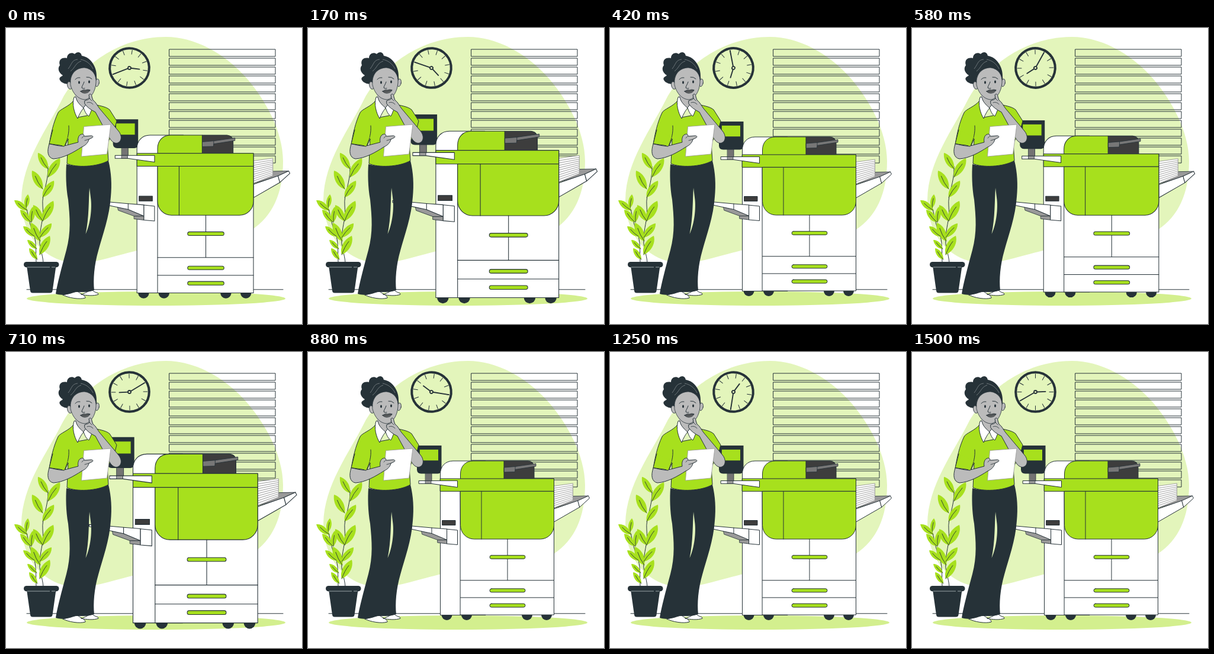
Animation of 500x500 px, one loop 1.54 s. Source, as an HTML page:

```html
<!DOCTYPE html>
<html lang="en">
<head>
<meta charset="utf-8">
<title>Waiting at the copier</title>
<style>
  html, body { margin: 0; width: 100%; height: 100%; overflow: hidden; background: #fff; }
  svg { display: block; width: 100vw; height: 100vh; }
  .g { fill: #a7e01d; }
  .d { fill: #263238; }
  .w { fill: #fff; }
  .s { fill: #bbb; }
  .m { fill: #999; }
  .n { fill: none; }
  .o { stroke: #263238; stroke-width: 1; stroke-linejoin: round; stroke-linecap: round; }
  .thin { stroke-width: .8; }
  .hand { stroke-width: 1.9; }
  .sheet { stroke: #8c8c8c; stroke-width: .8; }
</style>
</head>
<body>
<svg viewBox="0 0 500 500">
  <path fill="#e3f5bb" d="M270 15C318 15 368 42 404 82C438 120 468 175 468 225C468 280 450 318 415 341C370 372 280 360 221 376C180 386 150 397 122 397C60 396 26 345 26 290C27 225 70 170 95 120C125 65 190 15 270 15Z"/>
  <ellipse fill="#d3ef8e" cx="253.5" cy="457" rx="218.5" ry="12"/>
  <path class="n o" d="M35 441.8H468"/>
  <g id="blinds" class="n o"></g>

  <g id="clock">
    <circle class="n" r="33.3" stroke="#263238" stroke-width="4"/>
    <g id="ticks" class="n o"></g>
    <path class="n o hand" transform="rotate(240)" d="M0-2V-29.5"/>
    <path class="n o hand" transform="rotate(88)" d="M0-2V-17"/>
    <circle r="2.5" fill="#e3f5bb" stroke="#263238" stroke-width="1.8"/>
  </g>

  <g id="plant">
    <path class="n o" d="M63 397C62 380 55 370 57 352C59 330 64 322 62 300C60 280 72 262 71 234"/>
    <path class="n o" d="M51 397C50 375 52 362 46 345C38 328 40 322 33 300"/>
    <g id="leaves"></g>
    <path class="d" d="M35 402H84.500L78.500 444Q78 447.500 74 447.500H45Q41.500 447.500 41 444Z"/>
    <rect class="d" x="30" y="395" width="59.5" height="9.3" rx="4.6"/>
    <path class="n" stroke="#b9c4c4" stroke-width=".8" d="M36 404H74M77 404H83"/>
  </g>

  <g id="printer">
    <!-- output tray and paper stack -->
    <path class="m o thin" d="M415 263.5L448 243.500L474 243L457 252Z"/>
    <path class="w sheet" d="M415 226.5L447.500 222V250.500L415 263.500Z"/>
    <path id="sheets" class="n sheet"/>
    <path class="w o" d="M415.5 265L456 251L459 262L415.500 287Z"/>
    <path class="w o" d="M456 251L473.500 243L475.500 247L459 262Z"/>

    <!-- control screen -->
    <rect class="o thin" fill="#737373" x="198.5" y="203" width="10.5" height="16"/>
    <path class="d" d="M184 158H225.500V199.500A6 6 0 0 1 219.500 205.500H191Q184.500 205.500 184 199Z"/>
    <rect class="g o" x="188.5" y="164.3" width="32" height="19.5"/>

    <!-- wheels -->
    <g class="d">
      <circle cx="234.5" cy="444" r="9"/><circle cx="268" cy="444" r="9"/>
      <circle cx="370" cy="444" r="9"/><circle cx="403" cy="444" r="9"/>
    </g>

    <!-- body -->
    <path class="w o" d="M223.5 444V206C223.500 193 232 184 245 184H300V444Z"/>
    <path class="w o" d="M257.5 214H415.500V444H257.500Z"/>
    <path fill="#3d3d3d" class="o" d="M331 184H372Q382 185 382 195V214H331Z"/>
    <path class="g o" d="M257.5 214V206C257.500 193 266 184 279 184H331V214Z"/>
    <path class="g o" d="M223.5 214H415.500V235.300H223.500Z"/>
    <path class="g o" d="M257.5 235.300H415.500V293A23 23 0 0 1 392.500 316H280.500A23 23 0 0 1 257.500 293Z"/>
    <path class="n o" d="M293 235.300V316M337 316V385.700M257.500 385.700H415.500M257.500 414.900H415.500"/>
    <g class="g o">
      <rect x="307" y="343.4" width="60" height="6" rx="3"/>
      <rect x="307" y="399.8" width="60" height="6" rx="3"/>
      <rect x="307" y="425.1" width="60" height="6" rx="3"/>
    </g>
    <path fill="#777" class="o thin" d="M331.5 195L350 193.500L385 188.500V193L350 198.500L349.500 202.500L331.500 203Z"/>
    <path class="n o thin" d="M350 193.500V199"/>
    <rect class="o" fill="#3d3d3d" x="227" y="284.5" width="22" height="8"/>

    <!-- side shelves -->
    <path class="w o" d="M187.500 217.500H252.500V228.500L208 222.300H187.500Z"/>
    <path class="m o thin" d="M198.500 217.500H208V222.300H198.500Z"/>
    <path class="m o thin" d="M192 303L209 305L235 317.500H219L193 308Z"/>
    <path class="m o thin" d="M219 317.500H235V324L219 322Z"/>
    <path class="w o" d="M156 292.500L176 294L209 297L235 299V317.500L209 306.500L176 299.500L156 295.500Z"/>
    <path class="n o" d="M209 306.500V297"/>
    <path class="w o" d="M235 299.200L252.500 301V325.500L235 324Z"/>
  </g>

  <g id="woman">
    <!-- shoes and trousers -->
    <path class="w o" d="M96 451C108 449 116 444 121 445C127 450 134 451 134 456C124 459 106 456 96 451Z"/>
    <path class="w o" d="M127 450C135 448 140 443 146 443C149 447 157 447 156 450C149 453 135 452 127 450Z"/>
    <path class="d" fill-rule="evenodd" d="M102 230C117 235 154 235 173 224C178 244 179 265 177 285C175 318 163 350 156 376C149 400 147 425 149 443C141 446 133 446 125 446L118 446C108 449 95 453 84 449C87 430 94 405 102 375C110 345 108 320 105 290C101 268 101 245 102 230ZM141 270C139.500 290 140.500 320 134.500 348C141 335 145.500 310 143.500 290Z"/>

    <!-- neck and shirt -->
    <path class="g o" d="M114 123C106 133 91 137 88 143C80 160 76 178 73 197L99 201L105 187L103 229C118 236 154 235 173 224L171 195L183 172L187 157L175 138C168 132 155 131 145 128L137 148L121 151Z"/>
    <path class="s" d="M116 112L118 122L131 137L143 128V112Z"/>
    <path class="n o" d="M106 165C107 177 104 188 98 201"/>
    <path class="w o" d="M115 117C111 128 115 143 121 153C124 145 128 139 131 135C125 130 119 124 118 117Z"/>
    <path class="w o" d="M131 135C133 141 136 147 140 149C143 143 146 136 146 129L141 122Z"/>

    <!-- head -->
    <path class="d" d="M108 95C104 95 93 94 90.500 87C89.500 83 94 82 96 80C88 75 87 67 91 63C88 54 94 49 103 51C103 43 111 40 116 44C120 39 127 40 128 47C143 49 154 66 153 83C154 88 152 94 149 97L112 88Z"/>
    <path class="n" stroke="#8b9396" stroke-width=".7" d="M105 69C112 60 111 54 121 53M109 73C117 67 117 59 127 56M126 53C136 55 143 61 147 69"/>
    <ellipse class="s o thin" cx="107.5" cy="97" rx="3.8" ry="6.5" transform="rotate(-15 107.5 97)"/>
    <ellipse class="s o thin" cx="154" cy="92.5" rx="3.3" ry="6.5" transform="rotate(10 154 92.5)"/>
    <path class="s o thin" d="M109 88C111 73 122 67 133 67C146 69 153 79 152 92C151 108 143 119 134 121C122 121 112 110 109 96Z"/>
    <path class="n o" d="M117 87Q120 83 125 84M136 83Q141 82 145 86M132 91C131 95 128 98 128 101Q130 103 133 102"/>
    <ellipse class="d" cx="123.5" cy="92" rx="1.5" ry="2.4"/>
    <ellipse class="d" cx="140.5" cy="91" rx="1.5" ry="2.4"/>
    <path fill="#666" class="o thin" d="M126 107C130 104 133 104 134.500 105C137 103.500 140 104 142 105C139 111 130 112 126 107Z"/>
    <path class="n o thin" d="M126 107Q134 108 142 105"/>

    <!-- raised arm -->
    <path class="s o" d="M133 123C136 121 139 122 141 119L140 113C142 110 145 112 145 116L147 122C152 125 154 131 158 136L190 174C196 181 196 191 189 194C183 196 178 191 175 186L151 142C143 138 137 134 133 128Z"/>
    <path class="n o thin" d="M141 119L145 123M137 126Q143 124 147 129"/>

    <!-- paper and near arm -->
    <path class="w" stroke="#999" stroke-width=".8" d="M131.500 166.500L177 163L170.500 213L127.500 217Z"/>
    <path class="s o" d="M73 196C69 208 70 219 80 221C97 220 114 210 128 201C135 198 139 193 140 188L146 185C148 183 146 182 143 182L132 183C132 180 130 178 126 180C122 182 121 188 122 193L99 199Z"/>
    <path class="g" d="M79 172L73 195.500C81 194 91 196 98 200L104 184Z"/>
    <path class="n o" d="M79 172L73 195.500Q85 199 98 200"/>
    <path class="n o thin" d="M131 183L128 186M140 188L133 190"/>
  </g>
</svg>
<script>
  const $ = id => document.getElementById(id);
  const range = n => [...Array(n).keys()];

  $('blinds').innerHTML = range(13).map(i =>
    `<rect x="276" y="${36 + 15 * i}" width="179" height="12"/>`).join('');

  $('ticks').innerHTML = range(12).map(i =>
    `<path transform="rotate(${30 * i})" d="M0-30.500V-23.500"/>`).join('');

  $('sheets').setAttribute('d', range(9).map(i =>
    `M415 ${230.2 + 3.7 * i}L447.500 ${225 + 2.9 * i}`).join(''));

  // base x, base y, tip x, tip y
  const leaves = [
    [71, 238, 54, 211], [71, 252, 91, 220], [62, 272, 44, 241], [62, 286, 81, 258],
    [62, 326, 46, 299], [62, 326, 80, 292], [58, 360, 42, 329], [57, 354, 77, 330],
    [57, 383, 74, 351], [34, 304, 37, 281], [36, 308, 14, 291], [42, 328, 24, 307],
    [43, 328, 45, 302], [48, 352, 29, 335], [52, 373, 36, 358], [53, 391, 39, 372]
  ];
  $('leaves').innerHTML = leaves.map(([x, y, tx, ty]) => {
    const len = Math.hypot(tx - x, ty - y);
    const turn = Math.atan2(ty - y, tx - x) * 180 / Math.PI;
    const at = (a, b) => `${a * len} ${b * len}`;
    return `<g transform="translate(${x} ${y}) rotate(${turn})">
      <path class="g" d="M0 0C${at(.25, -.26)} ${at(.7, -.24)} ${at(1, 0)}C${at(.75, .24)} ${at(.3, .24)} 0 0Z"/>
      <path class="n o thin" d="M0 0Q${at(.4, -.06)} ${at(.7, 0)}"/></g>`;
  }).join('');

  const LOOP = 1540, STEPS = 37, BEAT = 36;
  const pulse = [[0, 1], [.1, 1.1], [.3, 1], [.4, 1], [.5, 1.1], [.6, 1], [1, 1]];

  function scaleAt(p) {
    const i = Math.max(1, pulse.findIndex(k => k[0] >= p));
    const [a, u] = pulse[i - 1], [b, v] = pulse[i];
    return u + (v - u) * (p - a) / (b - a);
  }

  function draw(now) {
    // 24 steps a second, with a short rest at the end of the loop
    const step = Math.floor(now % LOOP * STEPS / LOOP + .2);
    const p = Math.min((step % STEPS + .9) / BEAT, 1);
    $('printer').setAttribute('transform',
      `translate(316 304) scale(${scaleAt(p)}) translate(-316 -304)`);
    $('clock').setAttribute('transform', `translate(208.5 67.5) rotate(${360 * p})`);
  }

  const start = performance.now();
  function tick() {
    draw(performance.now() - start);
    requestAnimationFrame(tick);
  }
  tick();
</script>
</body>
</html>
```
